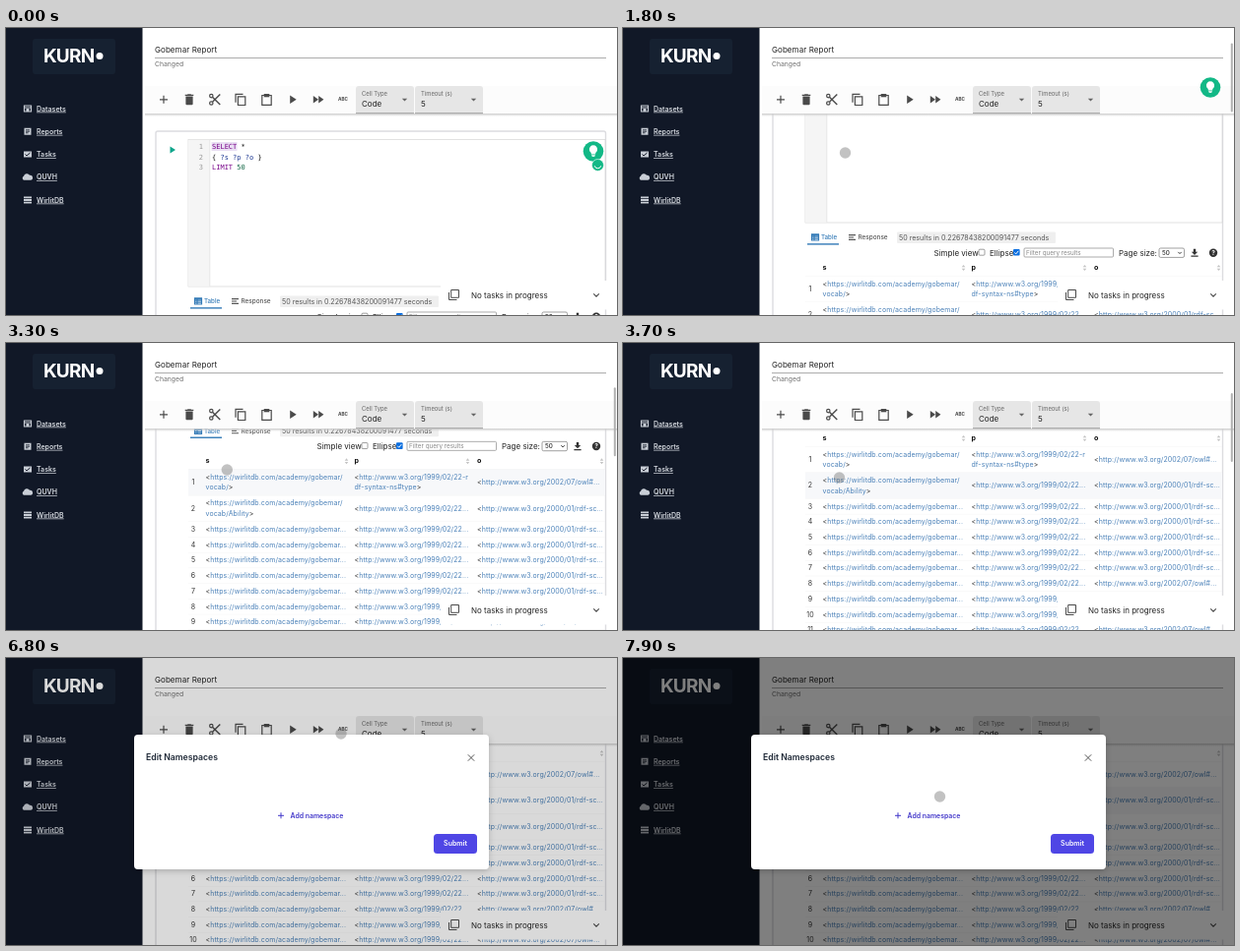
Write an HTML page that moves like this. It is 620 px wide and 292 px high and loops after 8000 ms.

```html
<!DOCTYPE html>
<html lang="en">
<head>
<meta charset="utf-8">
<title>Report editor</title>
<style>
  html, body { margin: 0; width: 100%; height: 100%; overflow: hidden; background: #fff; }
  svg { display: block; width: 620px; height: 292px; font-family: Inter, sans-serif; }
  text { white-space: pre; }
  .link { fill: #4a80b8; }
  .mono { font-family: "DejaVu Sans Mono", monospace; }
  .line { fill: none; stroke: currentColor; stroke-width: 1.2; }
</style>
</head>
<body>
<svg id="stage" viewBox="0 0 620 292"></svg>
<script>
const LOOP = 8000;
const ROW = 15.72, TALL = 26.6, FIRST = 317;
const stage = document.getElementById('stage');

// Text placed by its vertical middle
const text = (x, y, s, size = 7, attrs = '') =>
  `<text x="${x}" y="${y + size * 0.36}" font-size="${size}" ${attrs}>${s}</text>`;
const rect = (x, y, w, h, fill, attrs = '') =>
  `<rect x="${x}" y="${y}" width="${w}" height="${h}" fill="${fill}" ${attrs}/>`;
const circle = (x, y, r, fill, attrs = '') =>
  `<circle cx="${x}" cy="${y}" r="${r}" fill="${fill}" ${attrs}/>`;
// Icons are drawn around their own centre
const icon = (x, y, body, color = '#4a4a4a') =>
  `<g transform="translate(${x} ${y})" color="${color}" fill="${color}">${body}</g>`;
const line = (d, width = 1.2) => `<path class="line" d="${d}" style="stroke-width:${width}"/>`;
const shape = d => `<path d="${d}"/>`;

const tableIcon = line('M-3.5-3h7v6h-7zM-3.5-.8h7M-3.5 1.2h7M-1-3v6') + shape('M-4-3.5h8v2h-8z');

function sidebar() {
  const icons = [
    line('M-3.5-3h7v6h-7zM-3.5-1h7') + shape('M-1.5 0h3v3h-3z'),
    shape('M-3.5-3.5h7v7h-7z') + '<path d="M-2-1.5h4M-2 0h4M-2 1.5h2.5" stroke="#111827" stroke-width=".8"/>',
    shape('M-4-3h8v6h-8z') + '<path d="M-2.5 0l1.5 1.5L2.5-1.5" fill="none" stroke="#111827"/>',
    shape('M-4 3a2.2 2.2 0 0 1 0-4a3.3 3.3 0 0 1 6-1a2.5 2.5 0 0 1 1 5z'),
    shape('M-4-3.5h8v1.8h-8zM-4-.9h8v1.8h-8zM-4 1.7h8v1.8h-8z')
  ];
  const names = ['Datasets', 'Reports', 'Tasks', 'QUVH', 'WirlitDB'];
  return rect(0, 0, 138.5, 292, '#111827') + rect(27, 11, 84, 36, '#162131', 'rx="3"') +
    text(38, 28.5, 'KURN', 19, 'font-weight="700" fill="#fff" letter-spacing="-.8"') +
    circle(95, 28.5, 3.5, '#fff') +
    names.map((name, i) => {
      const y = 82 + i * 23.25;
      return icon(22, y, icons[i], '#c9ced6') +
        text(31, y, name, 7, 'font-weight="600" fill="#d6dae0" text-decoration="underline"');
    }).join('');
}

function header() {
  const select = (x, w, label, value) =>
    `<path d="M${x} 87V62q0-3 3-3h${w - 6}q3 0 3 3v25z" fill="#e6e6e6"/>` +
    rect(x, 86.4, w, 0.7, '#8a8a8a') +
    text(x + 6, 66.5, label, 5.9, 'fill="#666"') + text(x + 6, 77, value, 8, 'fill="#222"') +
    icon(x + w - 9.5, 73, shape('M-2.7-1.2h5.4L0 1.5z'), '#666');
  return rect(138.5, 0, 482, 87, '#fff') +
    text(151, 22.5, 'Gobemar Report', 8, 'fill="#222" letter-spacing=".07"') +
    rect(151, 30, 458, 0.7, '#888') + text(151, 36.7, 'Changed', 6.8, 'fill="#707070"') +
    rect(141, 59, 479, 28, '#fcfcfc') + rect(141, 87, 479, 3, 'url(#shade)') +
    icon(160, 72.8, line('M-4 0h8M0-4v8')) +
    icon(186, 72.8, shape('M-3.6-3.2h7.2v7.6q0 1-1 1h-5.2q-1 0-1-1zM-4.3-5h2.2l.6-.6h3l.6.6h2.2v1.1h-8.6z')) +
    icon(212, 72.8, line('M-2.3-2.3L5.3 5.3M-2.3 2.3L5.3-5.3', 1.4) +
      '<g class="line"><circle cx="-3.7" cy="-3.7" r="1.7"/><circle cx="-3.7" cy="3.7" r="1.7"/></g>') +
    icon(238, 72.8, line('M-2.6-3h7.4v8.7h-7.4zM-5 3v-8.5H2.5')) +
    icon(264.5, 72.8, line('M-4.7-4.3h9.4V5.6h-9.4z') + shape('M-2.8-5.8h5.6v3.3h-5.6z')) +
    icon(291, 72.8, shape('M-2.8-4.2L3.7 0L-2.8 4.2z')) +
    icon(317, 72.8, shape('M-5.2-3.8L0 0L-5.2 3.8zM.2-3.8L5.4 0L.2 3.8z')) +
    text(342, 72.8, 'ABC', 4.6, 'font-weight="800" fill="#555" text-anchor="middle"') +
    select(355, 59, 'Cell Type', 'Code') + select(415, 69, 'Timeout (s)', '5');
}

function editor() {
  const keyword = s => `<tspan fill="#770088">${s}</tspan>`;
  const variable = s => `<tspan fill="#1f3a93">${s}</tspan>`;
  const code = [
    keyword('SELECT') + ' *',
    `{ ${['?s', '?p', '?o'].map(variable).join(' ')} }`,
    keyword('LIMIT') + ' <tspan fill="#116644">50</tspan>'
  ];
  return rect(152, 105, 456.5, 1200, '#fff', 'rx="2" stroke="#dcdce0" stroke-width="1.4"') +
    icon(169, 124, shape('M-2.5-3.5L3 0L-2.5 3.5z'), '#0fa58b') +
    rect(185, 113.5, 423, 149.5, '#fff', 'stroke="#d4d4d4" stroke-width=".7"') +
    rect(185, 113.8, 22, 149, '#f5f5f5') + rect(206.6, 113.8, 0.6, 149, '#ddd') +
    rect(208.5, 116, 26, 9, '#e9dff3') +
    code.map((s, i) => {
      const y = 120.6 + i * 10.5;
      return text(200, y, i + 1, 7, 'class="mono" fill="#999" text-anchor="end"') +
        text(209, y, s, 7, 'class="mono" fill="#111"');
    }).join('');
}

function results() {
  const sorter = x => icon(x, 309, shape('M-1.8-.7h3.6L0-3zM-1.8.7h3.6L0 3z'), '#c4c4c4');
  return icon(195, 278, tableIcon, '#337ab7') +
    text(201, 278, 'Table', 6.2, 'font-weight="500" fill="#337ab7"') +
    rect(187, 284.2, 32, 1.4, '#337ab7') +
    icon(232.5, 278, shape('M-3.5-3h7v1.2h-7zM-3.5-.6h5v1.2h-5zM-3.5 1.8h7v1.2h-7z'), '#555') +
    text(238.5, 278, 'Response', 6.4, 'font-weight="500" fill="#555"') +
    rect(278, 272.5, 161, 11.5, '#efefef', 'rx="1"') +
    text(280, 278.2, '50 results in 0.22678438200091477 seconds', 7.1, 'fill="#555"') +
    text(315.5, 293.7, 'Simple view', 8, 'fill="#222"') +
    rect(361, 290.2, 6, 6, '#fff', 'rx="1" stroke="#777" stroke-width=".7"') +
    text(372, 293.7, 'Ellipse', 8, 'fill="#222"') +
    rect(396, 290, 6.6, 6.6, '#0b6fe0', 'rx="1"') +
    icon(399.3, 293.4, line('M-2 0l1.4 1.5L2-1.6', 1), '#fff') +
    rect(407, 289, 90.5, 9, '#fff', 'rx="1" stroke="#888" stroke-width=".7"') +
    text(409, 293.5, 'Filter query results', 6.3, 'fill="#888"') +
    text(503, 293.7, 'Page size:', 8, 'fill="#222"') +
    rect(544, 289, 25.5, 9.4, '#fff', 'rx="1.5" stroke="#777" stroke-width=".7"') +
    text(547, 293.7, '50', 6.4, 'fill="#111"') +
    icon(565, 293.7, line('M-1.7-.8L0 .9L1.7-.8', 0.9), '#222') +
    icon(580, 293.7, shape('M-1.2-4h2.4v3h2L0 2.2L-3.2-1h2zM-3.6 2.9h7.2v1.2h-7.2z'), '#333') +
    circle(599, 293.7, 4.2, '#333') +
    text(599, 293.7, '?', 6.5, 'font-weight="700" fill="#fff" text-anchor="middle"') +
    [['s', 202.5], ['p', 353.5], ['o', 478]].map(([s, x]) =>
      text(x, 308.5, s, 7.2, 'font-weight="700" fill="#111"')).join('') +
    [345.5, 468.5, 604.5].map(sorter).join('');
}

const S = '&lt;https://wirlitdb.com/academy/gobemar';
const P = '&lt;http://www.w3.org/1999/02/22';
const W3 = '&lt;http://www.w3.org/';

// Brackets stay dark, the address between them is blue
const link = (x, y, s) => text(x, y,
  s.replace(/(&lt;)?([^&]+)(&gt;)?/, (_, a = '', b, c = '') => `${a}<tspan class="link">${b}</tspan>${c}`),
  7, 'fill="#333" letter-spacing=".085"');
const pair = (x, y, a, b) => link(x, y - 5.3, a) + link(x, y + 5.3, b);

function row(n, top, word) {
  const height = word === undefined ? ROW : TALL, y = top + height / 2;
  return rect(185, top, 423, 0.4, '#f1f1f1') +
    text(190, y, n, 7, 'fill="#333" text-anchor="middle"') +
    (word === undefined ? link(202.5, y, S + '...') : pair(202.5, y, S + '/', `vocab/${word}&gt;`)) +
    (n === 1 ? pair(353.5, y, P + '-r', 'df-syntax-ns#type&gt;') : link(353.5, y, P + '...')) +
    link(478, y, W3 + (n === 1 || n > 7 ? '2002/07/owl#...' : '2000/01/rdf-sc...'));
}

const third = FIRST + 2 * TALL;
const laterRows = Array.from({ length: 9 }, (_, i) => row(i + 4, third + ROW * (i + 1))).join('');

const tasks = rect(441, 257, 171, 29.5, '#fff') +
  icon(454.5, 271.5, line('M-2.8-5h7.8v7.8h-7.8zM-5-2.5V5H3', 1)) +
  text(472, 271.7, 'No tasks in progress', 8, 'fill="#222"') +
  icon(599, 271.7, line('M-2.8-1.3L0 1.5L2.8-1.3', 1.1));

const bulb = circle(596, 125.5, 10.3, '#12b886') +
  icon(596, 125.5, shape('M-2.2 3v-1.6a4.1 4.1 0 1 1 4.4 0V3zM-1.8 3.8h3.6v.9q-1.8 1.6-3.6 0z'), '#fff');
const spinner = '<g id="spinner">' + circle(600.5, 139.5, 6, '#12b886', 'stroke="#fff" stroke-width=".6"') +
  '<path id="arc" d="M597.3 140.3a3.3 3.3 0 0 0 6.4 0" fill="none" stroke="#fff"/></g>';

const dialog = rect(130, 78, 360, 137, '#fff', 'rx="4" filter="url(#soft)"') +
  text(142, 101.2, 'Edit Namespaces', 8.7, 'font-weight="600" fill="#1f2937"') +
  icon(472, 101.5, line('M-3.2-3.2L3.2 3.2M3.2-3.2L-3.2 3.2', 1), '#555') +
  icon(279, 160.3, line('M-3 0h6M0-3v6', 1), '#4338ca') +
  text(288.5, 160.3, 'Add namespace', 6.9, 'font-weight="600" fill="#4338ca"') +
  rect(434, 179, 44, 20, '#4f46e5', 'rx="3.5"') +
  text(456, 188.8, 'Submit', 7, 'font-weight="600" fill="#fff" text-anchor="middle"');

stage.innerHTML = `<defs>
    <linearGradient id="shade" x2="0" y2="1"><stop stop-color="#ccc"/><stop offset="1" stop-color="#ccc" stop-opacity="0"/></linearGradient>
    <filter id="soft"><feDropShadow dx="0" dy="2" stdDeviation="3" flood-opacity=".2"/></filter>
  </defs>
  <g class="scrolled">${editor()}${results()}
    ${rect(185, 0, 423, TALL, '#f7f8fa', 'id="hover"')}
    ${row(1, FIRST, '')}${row(2, FIRST + TALL, 'Ability')}
    <g id="short">${row(3, third)}</g><g id="tall">${row(3, third, 'Gobémar')}</g>
    <g id="later">${laterRows}</g></g>
  ${header()}${tasks}
  <g class="scrolled">${bulb}${spinner}</g>
  ${sidebar()}
  ${rect(616.8, 0, 2, 70, '#b0b0b0', 'rx="1" id="thumb"')}
  <g id="modal">${rect(0, 0, 620, 292, '#000', 'id="dim"')}${dialog}</g>
  ${circle(0, 0, 5.7, '#6e6e6e', 'id="cursor" fill-opacity=".42"')}`;

const $ = id => document.getElementById(id);
const show = (id, on) => $(id).setAttribute('visibility', on ? 'visible' : 'hidden');
const move = (el, x, y) => el.setAttribute('transform', `translate(${x} ${y})`);

// Keys are [time, ...values]
function at(keys, t) {
  const i = keys.findIndex(k => k[0] > t);
  if (i < 0) return keys[keys.length - 1].slice(1);
  if (i === 0) return keys[0].slice(1);
  const [a, b] = [keys[i - 1], keys[i]], p = (t - a[0]) / (b[0] - a[0]);
  return a.slice(1).map((v, j) => v + (b[j + 1] - v) * p);
}

const SCROLL = [[1300, 0], [1800, 65], [2700, 142], [3600, 212]];
const CURSOR = [
  [100, 262, 230], [900, 234, 113], [1000, 219, 116], [1200, 225.5, 127], [3200, 225.5, 127],
  [3700, 219.5, 137], [4800, 247, 164.5], [5200, 247, 164.5], [6100, 335.5, 88], [6400, 340, 77],
  [6900, 340, 77], [7800, 323, 132], [7900, 321.5, 141]
];

function draw() {
  const t = Math.floor(performance.now() % LOOP / 100) * 100;
  const [offset] = at(SCROLL, t), [x, y] = at(CURSOR, t);
  const open = t >= 4500;

  document.querySelectorAll('.scrolled').forEach(el => move(el, 0, -offset));
  show('short', !open);
  show('tall', open);
  move($('later'), 0, open ? TALL - ROW : 0);

  const index = Math.floor((y + offset - FIRST) / TALL);
  $('hover').setAttribute('y', FIRST + TALL * index);
  show('hover', t >= 3300 && y > 88 && index >= 0 && index < 3);

  show('spinner', t < 900);
  $('arc').setAttribute('transform', `rotate(${t * 0.4} 600.5 139.5)`);
  show('thumb', t >= 1400 && t < 4600);
  $('thumb').setAttribute('y', offset * 0.24);

  show('modal', t >= 6800);
  $('dim').setAttribute('opacity', t < 7000 ? 0.15 : 0.5);
  show('cursor', t >= 100);
  move($('cursor'), x, y);
  requestAnimationFrame(draw);
}
draw();
</script>
</body>
</html>
```
